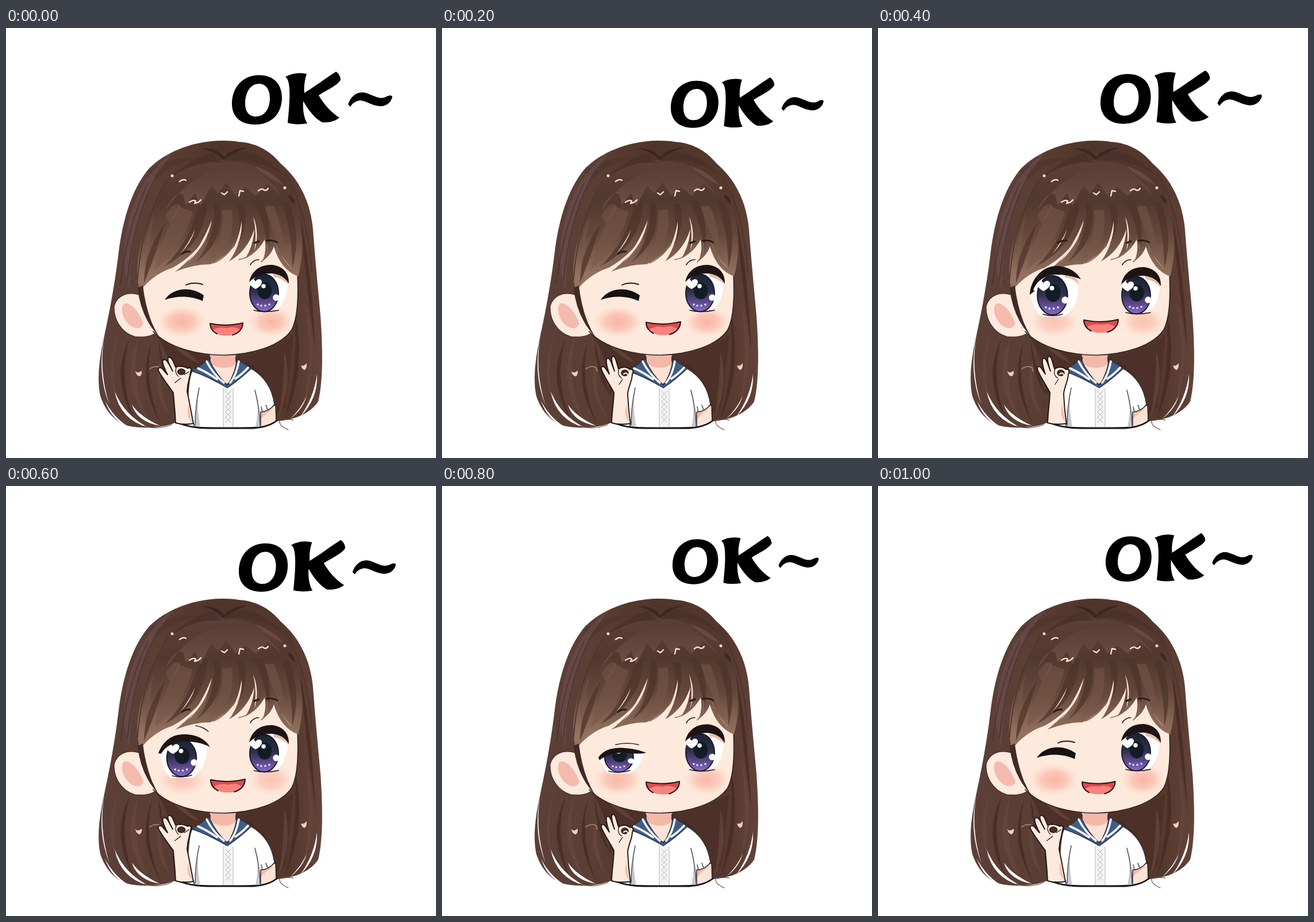
These frames come from a looping animation (748 by 748 pixels, 1200 ms). An HTML page:

```html
<!DOCTYPE html>
<html lang="en">
<head>
<meta charset="utf-8">
<title>OK~</title>
<style>
html, body { margin: 0; height: 100%; overflow: hidden; background: #fff; }
svg { display: block; width: 100vw; height: 100vh; }
.line { fill: none; stroke-linecap: round; stroke-linejoin: round; }
</style>
</head>
<body>
<svg viewBox="0 0 748 748">
<defs>
  <linearGradient id="back">
    <stop offset="0" stop-color="#5c3f38"/><stop offset=".25" stop-color="#5b3f35"/>
    <stop offset=".55" stop-color="#50342a"/><stop offset=".85" stop-color="#55382d"/><stop offset="1" stop-color="#62433a"/>
  </linearGradient>
  <linearGradient id="fringe" gradientUnits="userSpaceOnUse" x1="0" y1="230" x2="0" y2="430">
    <stop offset="0" stop-color="#5c4037"/><stop offset=".35" stop-color="#53382e"/>
    <stop offset=".65" stop-color="#65483b"/><stop offset="1" stop-color="#947260"/>
  </linearGradient>
  <linearGradient id="sheen" x2="0" y2="1">
    <stop offset="0" stop-color="#7a5c56" stop-opacity="0"/><stop offset="1" stop-color="#7d5f53" stop-opacity=".7"/>
  </linearGradient>
  <linearGradient id="irisFill" x2="0" y2="1">
    <stop offset="0" stop-color="#1c2330"/><stop offset=".45" stop-color="#2d2f49"/>
    <stop offset=".7" stop-color="#574585"/><stop offset="1" stop-color="#8a6cc4"/>
  </linearGradient>
  <radialGradient id="blush">
    <stop offset="0" stop-color="#f79b8a" stop-opacity=".68"/><stop offset=".5" stop-color="#f8a593" stop-opacity=".5"/>
    <stop offset="1" stop-color="#fbc4b2" stop-opacity="0"/>
  </radialGradient>
  <clipPath id="wide"><path d="M266 464C270 440 285 424 305 424C330 424 348 438 348 455C348 475 340 492 322 502H285C272 490 268 478 266 464Z"/></clipPath>
  <clipPath id="lowered"><path d="M268 466C276 448 290 438 310 438C334 438 350 448 349 462C347 482 340 498 324 508H286C275 496 270 482 268 466Z"/></clipPath>
  <clipPath id="half"><path d="M274 474C284 464 298 460 316 460C334 460 348 462 350 466C347 480 340 492 326 500H290C282 492 277 484 274 474Z"/></clipPath>
  <g id="iris">
    <ellipse rx="25" ry="32.5" fill="url(#irisFill)" stroke="#191a2b" stroke-width="2"/>
    <ellipse cx="1" cy="-4" rx="12.5" ry="15" fill="#121c27"/>
    <path d="M-15-7C-30-15-28-25-22-25C-18-25-16-22-15-20C-12-26-3-25-4-18C-5-12-11-9-15-7Z" fill="#fff"/>
    <circle cx="-1" cy="-12" r="3.8" fill="#fff"/>
    <circle cx="21" cy="8" r="5.8" fill="#fff"/>
    <path class="line" d="M-11 20h.1M-5 22h.1M2 22h.1M9 20h.1" stroke="#eee6ff" stroke-width="3.4"/>
  </g>
</defs>

<!-- hair behind -->
<path d="M372 196C330 197 283 212 250 243C218 280 203 335 196 390C190 440 181 490 171 535C162 575 158 612 164 640C172 664 187 684 212 692C240 698 275 696 298 685L470 684C500 682 528 672 543 650C552 615 551 555 547 500C543 455 538 405 534 350C530 305 512 265 478 236C460 214 436 200 405 198C394 196 383 196 372 196Z" fill="url(#back)"/>
<path d="M262 535Q384 610 500 535L486 660L455 680L438 600L325 592L292 640Q290 575 262 535Z" fill="#4d3027"/>
<g fill="#68493e" opacity=".65">
  <path d="M232 535Q212 610 250 686Q195 620 232 535Z"/>
  <path d="M198 525Q175 605 201 667Q166 605 198 525Z"/>
  <path d="M276 560Q257 620 288 680Q243 622 276 560Z"/>
  <path d="M285 545Q315 560 337 584Q304 570 285 545Z"/>
  <path d="M484 560Q484 620 474 678Q500 620 484 560Z"/>
  <path d="M518 470Q537 570 516 660Q550 575 518 470Z"/>
</g>
<g fill="#422820" opacity=".65">
  <path d="M215 540Q180 610 224 683Q194 610 215 540Z"/>
  <path d="M254 545Q226 615 270 690Q238 615 254 545Z"/>
  <path d="M266 545Q276 600 294 640Q266 605 266 545Z"/>
  <path d="M500 480Q512 585 484 680Q526 590 500 480Z"/>
  <path d="M512 330Q532 420 538 560Q520 430 512 330Z"/>
  <path d="M415 580Q440 590 456 620Q433 600 415 580Z"/>
</g>
<g fill="#fff">
  <path d="M189 632Q206 674 248 695Q199 682 189 632Z"/>
  <path d="M172 530Q160 595 180 656Q157 600 172 530Z"/>
  <path d="M219 655Q233 676 268 692Q228 685 219 655Z"/>
  <path d="M172 648Q186 676 212 693Q184 683 172 648Z"/>
  <path d="M541 602Q543 645 512 676Q536 642 541 602Z"/>
  <path d="M523 640Q516 664 494 680Q512 664 523 640Z"/>
</g>
<path class="line" d="M470 684Q486 679 500 682M476 682Q474 692 491 699M240 692Q262 700 288 690" stroke="#6b4b3f" stroke-width="1.2"/>
<g fill="#f2cdbd">
  <path d="M225 597Q230 602 236 596Q237 604 232 606Q226 604 225 597Z"/>
  <path d="M513 587Q518 589 523 583Q524 592 519 595Q514 592 513 587Z"/>
</g>
<path class="line" d="M250 593Q260 586 268 591L270 597" stroke="#a98271" stroke-width="1.7"/>

<!-- body -->
<path d="M355 566L354 590L384 626L400 590L399 566Z" fill="#fde3d5"/>
<path d="M356 566H400L399 585Q378 598 356 584Z" fill="#f4b8a9"/>
<path d="M440 664L469 656L470 684Q458 692 442 694Z" fill="#fde3d5" stroke="#2a2020" stroke-width="1.5"/>
<path d="M442 668L466 662Q452 670 444 680Z" fill="#f3bba9"/>
<path d="M327 592C319 600 317 625 316 655L328 694Q385 698 443 694V668Q458 667 467 655C464 632 454 608 426 592L384 620Z" fill="#fff" stroke="#353338" stroke-width="1.6"/>
<path d="M335 628L328 692L338 694Q331 660 335 628ZM434 632Q441 660 434 694L443 693Z" fill="#c9c9cf"/>
<path class="line" d="M336 626Q329 660 329 691M433 630Q441 660 442 692M446 668L444 659M455 664L452 656" stroke="#55545b" stroke-width="1.6"/>
<path d="M378 627H394V695H378Z" fill="#f4f4f5"/>
<path class="line" d="M378 627V694M395 627V694M382 632l9 9l-9 9l9 9l-9 9l9 9l-9 9M391 632l-9 9l9 9l-9 9l9 9l-9 9l9 9" stroke="#b2b2b8" stroke-width="1"/>
<path d="M353 576L324 597Q352 606 385 626Q407 611 427 592L402 576Q397 606 385 621Q366 604 353 576Z" fill="#3f5d87" stroke="#29303f" stroke-width="1.4"/>
<path class="line" d="M349 580Q360 602 379 617M334 592Q350 599 367 611M405 580Q401 603 390 617M421 591Q411 602 399 610" stroke="#fff" stroke-width="3.6"/>
<path class="line" d="M355 572V580M400 572V580" stroke="#352622" stroke-width="1.6"/>
<path class="line" d="M296 685C312 693 332 696 352 696H430C449 695 462 690 471 683" stroke="#161316" stroke-width="2.8"/>

<!-- raised hand, two tilts -->
<g fill="#fdeade" stroke="#211716" stroke-width="1.9" stroke-linejoin="round">
  <g data-on="035">
    <path d="M295 687C294 664 292 648 291 634C282 622 272 609 265 596C264 590 269 589 273 594L281 603C276 593 271 582 273 578C276 575 280 578 283 584L290 597C284 585 279 576 283 573C288 571 291 580 295 590C303 587 312 589 316 592C321 589 324 594 321 598C320 608 316 615 315 632C319 650 322 668 326 688Q309 691 295 687Z"/>
    <ellipse cx="305" cy="598" rx="6.5" ry="5" fill="#4a2c24" stroke-width="1.4"/>
    <path class="line" d="M296 591Q293 600 300 606M304 609L294 617M310 603L318 598" stroke-width="1.3"/>
    <path d="M317 654Q320 674 324 686Q313 676 317 654Z" fill="#f3bba9" stroke="none"/>
  </g>
  <g data-on="124">
    <path d="M295 687C296 664 299 649 299 634C292 620 281 605 277 593C277 587 282 588 285 593L291 602C287 590 284 579 287 575C291 573 294 579 296 586L300 597C296 584 293 574 297 571C302 570 303 581 307 593C315 588 323 590 327 594C332 592 334 598 331 602C331 614 325 621 323 636C324 655 325 672 328 688Q309 691 295 687Z"/>
    <ellipse cx="318" cy="600" rx="6" ry="5" fill="#4a2c24" stroke-width="1.4"/>
    <path class="line" d="M316 602Q321 598 323 603" stroke="#fff" stroke-width="2"/>
    <path class="line" d="M308 593Q304 603 312 609M314 611L308 620" stroke-width="1.3"/>
    <path d="M321 654Q322 674 326 686Q315 676 321 654Z" fill="#f3bba9" stroke="none"/>
  </g>
</g>

<!-- ear and face -->
<path d="M232 464C213 458 193 464 188 484C187 507 200 530 224 537C242 539 255 536 264 528L245 470Z" fill="#fdeade" stroke="#4a302a" stroke-width="1.5"/>
<path d="M205 480C214 475 230 490 239 514C235 526 222 524 212 514C202 503 199 486 205 480Z" fill="#f4bbae"/>
<path d="M236 440C235 490 246 520 266 537C294 558 340 569 380 569C430 568 478 553 497 525C508 504 509 465 507 415L470 340H300Z" fill="#fdeadd"/>
<path class="line" d="M256 528C285 558 336 569 380 569C430 568 478 553 497 525C508 504 509 465 507 425" stroke="#35231f" stroke-width="1.7"/>

<g id="cheeks" fill="url(#blush)">
  <ellipse cx="306" cy="511" rx="43" ry="28"/>
  <ellipse cx="461" cy="511" rx="40" ry="27"/>
</g>

<!-- fringe -->
<path d="M233 458C219 410 238 335 284 265C315 238 350 231 380 230C430 232 475 254 501 302C517 342 520 390 508 432Q478 421 466 380Q462 394 446 406Q454 387 450 368Q438 390 416 401Q430 380 432 350Q420 388 388 406Q400 390 407 366Q392 392 356 411Q326 411 294 424Q330 397 350 360Q328 396 290 417Q256 428 233 458Z" fill="url(#fringe)"/>
<g fill="#775849" opacity=".55">
  <path d="M257 328Q245 390 246 435Q233 380 257 328Z"/>
  <path d="M300 310Q270 365 259 420Q306 385 325 320Z"/>
  <path d="M376 318Q380 368 352 405Q403 378 392 315Z"/>
  <path d="M450 310Q463 355 486 398Q480 340 466 310Z"/>
</g>
<g fill="#4d3329" opacity=".7">
  <path d="M337 300Q322 370 276 414Q347 377 350 302Z"/>
  <path d="M362 304Q365 370 330 407Q382 370 372 305Z"/>
  <path d="M402 306Q412 348 398 383Q424 350 414 306Z"/>
  <path d="M430 300Q453 345 456 389Q465 340 445 300Z"/>
  <path d="M480 305Q498 355 498 418Q515 355 491 302Z"/>
  <path d="M276 340Q240 390 240 444Q262 390 276 340Z"/>
</g>
<g fill="#fbe2d3">
  <path d="M358 334Q351 376 316 407Q341 377 358 334Z"/>
  <path d="M329 350Q322 374 303 393Q319 373 329 350Z"/>
  <path d="M410 336Q412 374 386 400Q404 374 410 336Z"/>
  <path d="M430 328Q442 357 432 388Q437 358 430 328Z"/>
  <path d="M466 366Q474 395 499 420Q478 402 466 366Z"/>
</g>
<path class="line" d="M349 365Q340 395 306 415M398 375Q384 399 361 409M440 376Q430 398 405 403M455 374Q458 393 444 407M470 385Q480 414 503 424" stroke="#8a6857" stroke-width="1.6"/>

<!-- crown shading and shine -->
<g fill="#49302a">
  <path d="M246 250Q290 220 344 226Q297 228 262 263Z" opacity=".45"/>
  <path d="M281 263Q330 228 380 235Q357 229 365 216Q330 222 281 263Z" opacity=".8"/>
  <path d="M378 233Q430 220 482 256Q440 207 381 217Q394 223 378 233Z" opacity=".8"/>
  <path d="M379 230Q362 213 340 210Q366 207 380 225Q394 208 421 208Q394 216 379 230Z" fill="#3d2620"/>
</g>
<path d="M292 215Q235 280 220 390Q213 440 217 456Q197 420 210 350Q228 260 292 215Z" fill="#6b4f4f" opacity=".6"/>
<path class="line" d="M268 247Q224 315 211 440M281 264Q236 335 229 437M247 270Q212 340 199 445M486 253Q525 320 532 425" stroke="#4a332e" stroke-width="1.6"/>
<path d="M278 316Q292 284 308 289L313 308L329 287L338 310L357 274L369 288L383 268L399 291L416 277L435 292L455 270L478 291Q444 240 398 240Q325 246 278 316Z" fill="url(#sheen)"/>
<path d="M278 325Q293 300 304 309Q299 328 284 340ZM432 240Q465 250 484 274Q453 260 432 240Z" fill="#78594e" opacity=".5"/>
<path class="line" d="M302 267Q308 262 313 265M319 303Q326 298 330 301L328 305Q335 304 339 299M375 287L380 290L385 285M405 292L407 283L413 284M439 283Q445 278 449 282Q454 283 456 279" stroke="#f9dfcf" stroke-width="2.4"/>
<g fill="#f9dfcf"><circle cx="289" cy="257" r="2.5"/><circle cx="485" cy="278" r="2.5"/></g>
<path d="M490 290Q501 291 503 306Q494 302 490 290Z" fill="#402822"/>
<path d="M229 452Q234 503 267 538Q245 505 238 448Z" fill="#432a24"/>

<!-- brows and lid creases -->
<g class="line" stroke="#2b1b19">
  <path d="M432 374L440 371M453 370Q464 368 472 373" stroke-width="3"/>
  <path data-on="01345" d="M306 393Q313 388 320 389" stroke-width="3"/>
  <path data-on="2" d="M313 374Q320 369 328 370" stroke-width="3"/>
  <path d="M425 412Q430 403 440 403" stroke-width="1.7"/>
  <path data-on="015" d="M313 447Q326 441 342 446" stroke-width="1.9"/>
  <path data-on="3" d="M330 417Q343 419 352 427" stroke-width="1.5"/>
  <path data-on="4" d="M302 450Q322 445 342 450" stroke-width="1.5"/>
</g>

<!-- right eye -->
<g id="rightEye">
  <path d="M426 440Q446 416 472 420Q492 428 490 448Q488 474 472 490H435Q424 470 426 440Z" fill="#fff"/>
  <path d="M464 425Q488 428 491 446Q478 434 466 433Z" fill="#e8bda9"/>
  <use href="#iris" x="449" y="461"/>
  <path d="M423 442C427 422 443 411 463 412C481 414 493 426 492 445C486 434 476 428 462 427C444 427 432 433 423 442Z" fill="#1d1314"/>
  <path class="line" d="M431 491Q450 496 474 491" stroke="#2b1c22" stroke-width="1.7"/>
</g>

<!-- left eye -->
<path data-on="015" d="M276 473C288 454 319 447 344 465L342 475C320 465 296 466 276 473Z" fill="#171112"/>
<g data-on="2">
  <g clip-path="url(#wide)"><path d="M260 410H360V510H260Z" fill="#fff"/><use href="#iris" transform="translate(303.5 465) scale(1.05)"/></g>
  <path d="M325 425Q345 429 350 446Q337 434 325 434Z" fill="#e8bda9"/>
  <path d="M264 464C265 440 283 415 309 414C331 414 345 424 353 437C340 432 326 429 309 429C288 430 275 442 270 456L273 457Z" fill="#1d1314"/>
  <path class="line" d="M287 498Q304 503 321 498" stroke="#2b1c22" stroke-width="1.7"/>
</g>
<g data-on="3">
  <g clip-path="url(#lowered)"><path d="M260 430H360V515H260Z" fill="#fff"/><use href="#iris" transform="translate(305.5 473) scale(1.03 1)"/></g>
  <path d="M265 465C272 446 287 431 311 432C333 432 348 442 355 454C342 447 329 445 311 444C291 445 278 453 270 465L275 466Z" fill="#1d1314"/>
  <path class="line" d="M289 504Q306 509 323 503" stroke="#2b1c22" stroke-width="1.7"/>
</g>
<g data-on="4">
  <g clip-path="url(#half)"><path d="M260 450H360V510H260Z" fill="#fff"/><use href="#iris" transform="translate(308 472) scale(1 .78)"/></g>
  <path d="M272 472C282 458 299 454 319 456C335 457 348 461 355 464C345 467 330 465 315 464C299 464 285 468 274 477Z" fill="#1d1314"/>
  <path class="line" d="M290 496Q308 501 327 495" stroke="#2b1c22" stroke-width="1.7"/>
</g>

<!-- mouth -->
<g id="mouth">
  <path d="M355 514Q383 520 412 513C413 525 401 535 384 535C367 535 355 527 355 514Z" fill="#df4a4d"/>
  <path d="M359 526Q370 519 384 522Q397 518 407 525Q398 535 384 535Q367 535 359 526Z" fill="#f5847d"/>
  <path class="line" d="M367 532C359 528 355 522 355 514Q383 520 412 513C412 523 405 531 394 534" stroke="#2c1516" stroke-width="2"/>
</g>

<!-- brush lettering -->
<g id="words" role="img" aria-label="OK~" fill-rule="evenodd">
  <path d="M393 132C393 102 413 82 440 82C467 82 480 99 480 121C480 150 461 168 433 168C408 168 393 154 393 132ZM416 131C416 147 424 154 435 154C450 154 459 140 459 122C459 107 452 97 440 97C425 97 416 113 416 131Z"/>
  <path d="M486 85C497 79 508 77 523 80C519 92 518 104 519 113C537 102 555 88 574 76C578 78 582 84 582 90C578 99 560 107 544 117C553 133 566 147 580 156C573 162 562 165 550 164C538 158 526 143 517 127C516 142 518 156 524 166C512 168 500 168 490 165C492 145 495 115 492 97C491 91 489 87 486 85Z"/>
  <path d="M595 133C600 118 612 109 626 113C639 117 648 124 658 121C664 119 668 115 672 119C671 128 662 137 650 136C636 135 626 126 616 126C607 127 602 132 599 137Z"/>
</g>
</svg>
<script>
// words and mouth: x, y, scale; eye: vertical shift; blush: opacity
const poses = [
  { words: [393, 76, 1],     mouth: [354, 513, 1],    eye: 0,   blush: 1 },
  { words: [398, 86, .953],  mouth: [354, 511, 1.05], eye: 0,   blush: 1 },
  { words: [387, 74, 1.007], mouth: [357, 507, 1.05], eye: 4,   blush: .75 },
  { words: [405, 94, .979],  mouth: [355, 510, 1.05], eye: 4,   blush: .75 },
  { words: [401, 87, .912],  mouth: [354, 514, 1.02], eye: 2.5, blush: .95 },
  { words: [396, 82, .917],  mouth: [354, 514, 1.01], eye: 2,   blush: 1 }
];
const $ = id => document.getElementById(id);
const parts = document.querySelectorAll('[data-on]');
const place = (id, [x, y, s], ox, oy) =>
  $(id).setAttribute('transform', `translate(${x} ${y}) scale(${s}) translate(${-ox} ${-oy})`);
const start = performance.now();

function draw(now) {
  const i = Math.floor(Math.max(0, now - start) % 1200 / 200);
  const pose = poses[i];
  parts.forEach(p => p.style.display = p.dataset.on.includes(i) ? '' : 'none');
  place('words', pose.words, 393, 76);
  place('mouth', pose.mouth, 354, 513);
  $('rightEye').setAttribute('transform', `translate(0 ${pose.eye})`);
  $('cheeks').setAttribute('opacity', pose.blush);
  requestAnimationFrame(draw);
}
draw(start);
</script>
</body>
</html>
```
